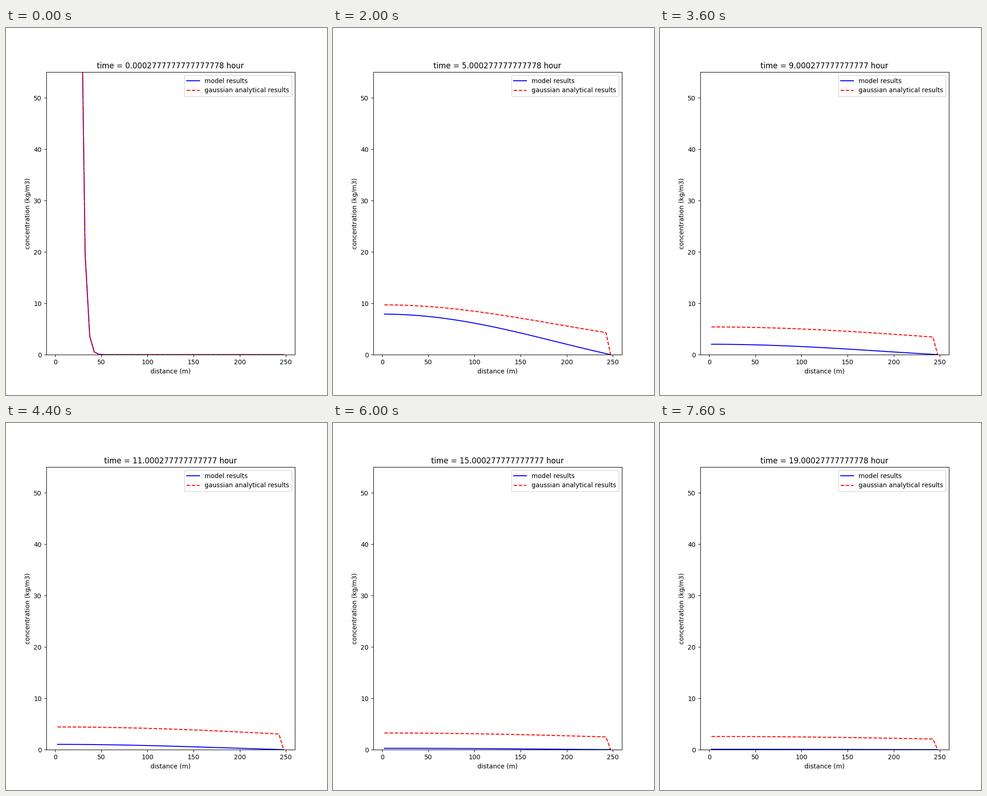
A matplotlib script for the animation above (8 s loop, 700 px wide and 800 px high).

```python
import numpy as np
import matplotlib.pyplot as plt
from matplotlib.animation import FuncAnimation

DR = 5.0             # cell width, m
DIFFUSIVITY = 1.0    # m2/s
SPREAD = 200.0       # twice the initial variance, m2
STRENGTH = 7.0e5
MODEL_GAIN = 1.01
HOURS = 20

r = np.arange(DR / 2, 250, DR)


def gaussian(seconds):
    width = SPREAD + 4 * DIFFUSIVITY * seconds
    c = STRENGTH / width * np.exp(-r**2 / width)
    c[-1] = 0
    return c


def one_second_step():
    """Explicit radial diffusion, closed at the centre, zero at the rim."""
    n = len(r)
    step = np.eye(n)
    for i in range(n - 1):
        outer = DIFFUSIVITY * (r[i] + DR / 2) / (r[i] * DR**2)
        inner = DIFFUSIVITY * (r[i] - DR / 2) / (r[i] * DR**2)
        step[i, i] -= outer + inner
        step[i, i + 1] += outer
        if i:
            step[i, i - 1] += inner
    step[-1] = 0
    return step


step = one_second_step()
hour_step = np.linalg.matrix_power(step, 3600)
model = [step @ (MODEL_GAIN * gaussian(0))]
for _ in range(HOURS - 1):
    model.append(hour_step @ model[-1])

fig, ax = plt.subplots(figsize=(7, 8), dpi=100)
model_line, = ax.plot(r, model[0], "b-", label="model results")
exact_line, = ax.plot(r, gaussian(1), "r--", label="gaussian analytical results")
ax.set_ylim(0, 55)
ax.set_xlabel("distance (m)")
ax.set_ylabel("concentration (kg/m3)")
ax.legend(loc="upper right")
title = ax.set_title("")


def update(hour):
    seconds = 3600 * hour + 1
    model_line.set_ydata(model[hour])
    exact_line.set_ydata(gaussian(seconds))
    title.set_text(f"time = {seconds / 3600} hour")
    return model_line, exact_line, title


anim = FuncAnimation(fig, update, frames=HOURS, interval=400, repeat=True)
plt.show()
```
